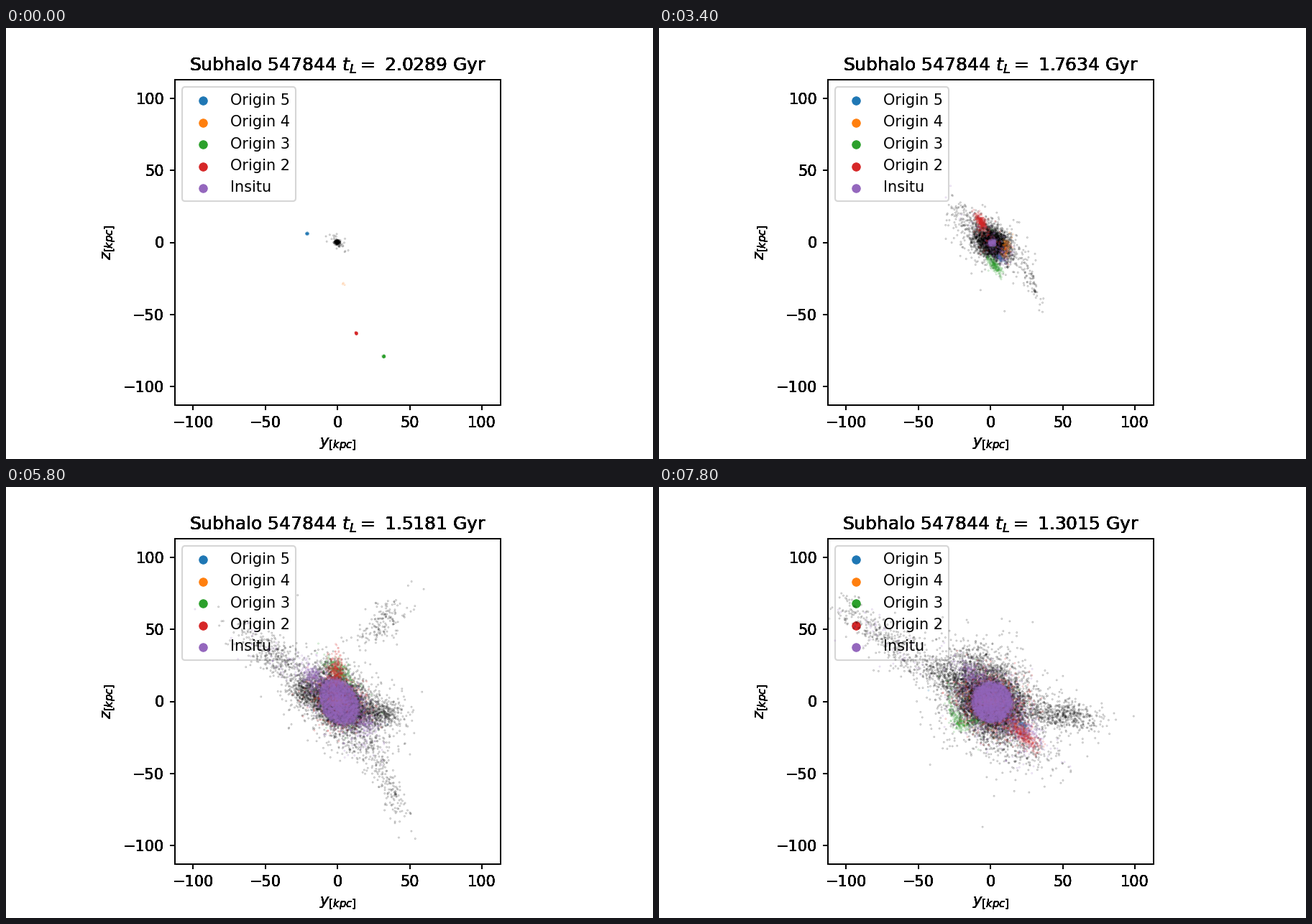
Write a matplotlib script that moves like this. It is 900 px wide and 600 px high and loops after 8000 ms.

```python
import numpy as np
import matplotlib.pyplot as plt
from matplotlib.animation import FuncAnimation

FRAMES, STEP = 40, 200
LAST = FRAMES - 1
LIMIT = 112.8
BLACK, BLUE, ORANGE, GREEN, RED, PURPLE = (
    "black", "tab:blue", "tab:orange", "tab:green", "tab:red", "tab:purple")
LEGEND = [("Origin 5", BLUE), ("Origin 4", ORANGE), ("Origin 3", GREEN),
          ("Origin 2", RED), ("Insitu", PURPLE)]

KEYS = [0, 9, 17, 25, 29, 33, 39]
LOOKBACK = [2.0289, 1.9147, 1.7634, 1.6107, 1.5181, 1.4359, 1.3015]

rng = np.random.default_rng(547844)
layers = {c: [] for c in (BLACK, BLUE, ORANGE, GREEN, RED, PURPLE)}


def ramp(i, start, end):
    return float(np.clip((i - start) / (end - start), 0, 1))


class Swarm:
    """Orbiting points in an ellipse; rule(i) gives
    (y, z, length, width, degrees, count, bend)."""

    def __init__(self, color, rule, spin=0.08, shape="normal"):
        self.rule = rule
        n = max(int(rule(i)[5]) for i in range(FRAMES)) + 1
        if shape == "disc":
            self.radius = np.sqrt(rng.random(n)) + 0.06 * rng.normal(size=n)
        else:
            self.radius = np.sqrt(rng.exponential(2, n))
            if shape == "wide":
                self.radius *= 0.8 + 0.25 * rng.exponential(1, n)
        self.phase = rng.uniform(0, 2 * np.pi, n)
        self.rate = spin * rng.uniform(0.6, 1.4, n)
        layers[color].append(self)

    def points(self, i):
        y, z, length, width, deg, count, bend = self.rule(i)
        n = int(count)
        a = self.phase[:n] + self.rate[:n] * i
        u, v = self.radius[:n] * np.cos(a), self.radius[:n] * np.sin(a)
        p, q = u * length, v * width + bend * u * u
        c, s = np.cos(np.radians(deg)), np.sin(np.radians(deg))
        return np.column_stack([y + p * c - q * s, z + p * s + q * c])


def body(i, count):
    g = i / LAST
    tilt = -20 - 15 * g - 15 * np.sin(np.pi * g)
    return 1.5 * np.sin(3 * g), -g, 1.1 + 11 * g ** 0.75, 0.8 + 8.7 * g, tilt, count, 0


def halo(i):
    g = i / LAST
    return 0, 0, 3 + 19 * g, 2 + 13 * g, -35, 30 + 1350 * g ** 1.4, 0


def core(i):
    """Disc that swells when the satellites merge and is stretched meanwhile."""
    size = 14 / (1 + np.exp((22 - i) / 3.5))
    stretch = 1 + 0.45 * np.exp(-((i - 27) / 4) ** 2)
    return 1, -0.5, size * stretch, size, 98 + 5 * (i - 25), 22 * size ** 2, 0


def satellite(color, path, cap, few, many, bend=0):
    """Clump on a path, drawn out along its direction of travel."""
    path = np.array(path, float)
    times = KEYS[:len(path)]

    def at(i):
        return np.array([np.interp(i, times, path[:, k]) for k in (0, 1)])

    def rule(i):
        dy, dz = at(i + 1.5) - at(i - 1.5)
        length = min(0.45 * np.exp(i / 8), cap)
        count = few + (many - few) * ramp(i, 0, 25)
        return (*at(i), length, 0.2 + 0.35 * length, np.degrees(np.arctan2(dz, dy)),
                count, bend * ramp(i, 33, LAST))

    Swarm(color, rule)


def stream(color, born, peak, path, size, deg, many, gone=None, insitu=0):
    """Debris that leaves the body, lengthens and, if gone is set, thins out."""
    end = gone or LAST
    start, top, finish = path

    def rule(i, share=1):
        y, z = (np.interp(i, [born, peak, end], [start[k], top[k], finish[k]])
                for k in (0, 1))
        count = many * share * ramp(i, born, peak)
        if gone:
            count *= 1 - ramp(i, peak, gone)
        return (y, z, size[0] * (0.3 + 0.7 * ramp(i, born, end)),
                size[1] * (0.5 + 0.5 * ramp(i, born, peak)), deg, count, 0)

    Swarm(color, rule)
    if insitu:
        Swarm(PURPLE, lambda i: rule(i, insitu))


Swarm(BLACK, lambda i: body(i, 150 + 5400 * i / LAST), spin=0.45)
Swarm(BLACK, halo, spin=0.2, shape="wide")
Swarm(PURPLE, core, spin=0.5, shape="disc")
for color, many in ((BLUE, 25), (ORANGE, 40), (GREEN, 200), (RED, 850), (PURPLE, 1100)):
    Swarm(color, lambda i, m=many: body(i, m * ramp(i, 16, 32)), spin=0.4)

stream(BLACK, 11, 27, [(24, -5), (34, -60), (36, -40)], (22, 4), -69, 210, gone=38)
stream(BLACK, 19, 29, [(14, 8), (32, 56), (22, 55)], (18, 5), 42, 160, gone=36)
stream(BLACK, 13, 27, [(-8, 12), (-36, 27), (-70, 41)], (25, 6), -36, 400, insitu=0.12)
stream(BLACK, 20, 29, [(8, 0), (28, -8), (50, -9)], (14, 5), -8, 520)
stream(BLACK, 20, 29, [(5, 16), (-22, 6), (-28, 18)], (9, 5), -20, 330)
stream(BLACK, 24, 33, [(0, 18), (-8, 24), (-8, 26)], (12, 6), -15, 280)
stream(BLACK, 19, 30, [(9, -30), (16, -30), (20, -36)], (15, 7), -12, 150, insitu=0.2)
stream(PURPLE, 18, 25, [(-4, 8), (-18, 16), (-10, 15)], (10, 4), -50, 330)
stream(PURPLE, 13, 25, [(3, -8), (14, -11), (22, -20)], (9, 5), -40, 240)

satellite(BLUE, [(-21, 6), (12, -19.5), (6.5, -11), (6.5, -15), (0, 0), (14, -12),
                 (22, -16)], 1.5, 30, 40)
satellite(ORANGE, [(4, -29), (-2, -10), (11, -4), (0, 0)], 4, 3, 130)
satellite(GREEN, [(32, -79), (16.5, -36), (2.5, -16), (-25, 22), (1, 21), (20, -28),
                  (-20, -16)], 7, 50, 240, bend=-4)
satellite(RED, [(13, -63), (9.5, -38), (-6.5, 14), (-20, 14), (-1, 18), (-20, 18),
                (22, -22)], 8, 60, 400)

fig = plt.figure(figsize=(6, 4), dpi=150, facecolor="white")


def make_axes():
    ax = fig.add_axes([0.125, 0.125, 0.775, 0.755], facecolor="none")
    ax.set(xlim=(-LIMIT, LIMIT), ylim=(-LIMIT, LIMIT), aspect="equal",
           xlabel="$y_{[kpc]}$", ylabel="$z_{[kpc]}$")
    ticks = range(-100, 101, 50)
    ax.set_xticks(ticks)
    ax.set_yticks(ticks)
    return ax


# stacked copies give the axis text its heavy weight
stack = [make_axes() for _ in range(7)]
ax = stack[-1]
for name, color in LEGEND:
    ax.scatter([], [], s=30, color=color, linewidths=0.5, label=name)
ax.legend(loc="upper left")

# the points lie over the legend
dots = {color: ax.scatter([], [], s=0.9, facecolors="none", edgecolors=color,
                          linewidths=0.4, alpha=0.28, zorder=6 + k)
        for k, color in enumerate(layers)}


def update(i):
    for a in stack:
        a.set_title(f"Subhalo 547844 $t_L=$ {np.interp(i, KEYS, LOOKBACK):.4f} Gyr")
    for color, swarms in layers.items():
        dots[color].set_offsets(np.vstack([s.points(i) for s in swarms]))
    return list(dots.values())


anim = FuncAnimation(fig, update, frames=FRAMES, interval=STEP,
                     init_func=lambda: update(0), repeat=True, repeat_delay=0)
plt.show()
```
